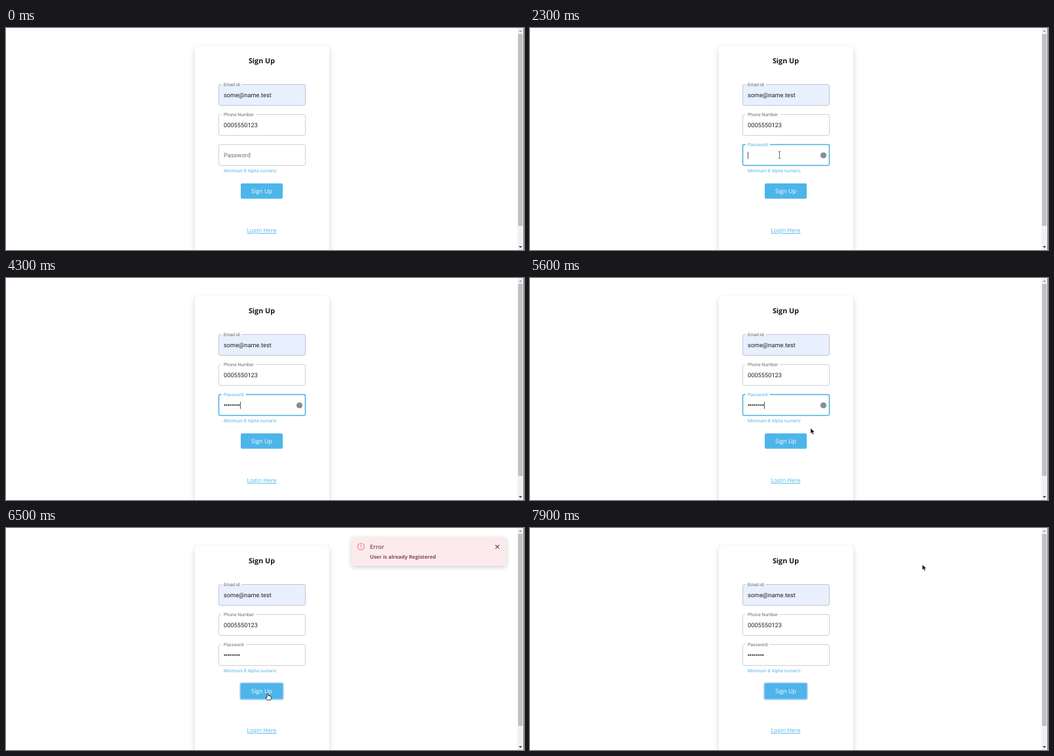
Recreate the animation shown at these times as an HTML page. Size 790 px wide and 340 px high, loop 8 s.

```html
<!DOCTYPE html>
<html lang="en">
<head>
<meta charset="utf-8">
<title>Sign Up</title>
<style>
  html, body { margin: 0; width: 100%; height: 100%; overflow: hidden; background: #fff; }
  svg { display: block; width: 790px; height: 340px; }
  text { font-family: Roboto, sans-serif; font-size: 9.25px; fill: #212121; text-rendering: geometricPrecision; white-space: pre; }
  .ui { font-family: "Open Sans", "Noto Sans", sans-serif; font-size: 8.95px; font-weight: 500; }
  .mid { text-anchor: middle; }
  .small { font-size: 6.92px; fill: #6c6c6c; }
  .card { fill: #fff; filter: drop-shadow(0 0 .7px rgba(0,0,0,.35)) drop-shadow(0 4px 4px rgba(0,0,0,.17)); }
  .toast { fill: #fae6e8; filter: drop-shadow(0 2px 3.5px rgba(0,0,0,.25)); }
  .edge { fill: none; stroke: #d0d0d6; }
  .blue { fill: #4db5ea; }
</style>
</head>
<body>
<svg viewBox="0 0 790 340">
  <rect class="card" x="288" y="28" width="205" height="340" rx="2.5"/>

  <g id="scroll">
    <rect x="780" width="9" height="340" fill="#f1f1f1"/>
    <rect x="781" y="9" width="7" height="294" fill="#c1c1c1"/>
    <path d="M782 6h5l-2.5-3z" fill="#a3a3a3"/>
    <path d="M782 334h5l-2.5 3z" fill="#404040"/>
    <rect x="789" width="1" height="340" fill="#777"/>
  </g>

  <text class="ui mid" x="390" y="54" style="font-size:10.8px;font-weight:700;fill:#17171f">Sign Up</text>

  <rect x="324.5" y="86.5" width="132" height="32" rx="2.5" fill="#e8f0fe"/>
  <path class="edge" id="emailEdge" style="stroke:#bfc3d6"/>
  <text class="small" x="332" y="89">Email id</text>
  <text x="332" y="106">some@name.test</text>

  <path class="edge" id="phoneEdge"/>
  <text class="small" x="332" y="135.2">Phone Number</text>
  <text x="332" y="152">0005550123</text>

  <path class="edge" id="passEdge"/>
  <text id="passLabel" x="332">Password</text>
  <text id="dots" x="332" y="198.2" stroke="#212121" stroke-width=".3"></text>
  <rect id="caret" y="189.5" width=".8" height="11" fill="#222"/>
  <circle id="badge" cx="447.5" cy="195" r="4.6" fill="#8c8c8c"/>
  <text class="small" x="332" y="220.5" style="fill:#58b4e8">Minimum 8 Alpha numeric</text>

  <rect id="ring" x="356.3" y="236.5" width="67.4" height="27" rx="3.5" fill="#a3c8f7"/>
  <rect class="blue" x="358" y="238" width="64" height="23.5" rx="2"/>
  <text class="ui mid" x="390" y="253.3" style="fill:#fff">Sign Up</text>
  <text class="ui mid blue" x="390" y="313.2" text-decoration="underline">Login Here</text>

  <g id="toast">
    <rect class="toast" x="527" y="14" width="236" height="44" rx="3"/>
    <circle cx="541.5" cy="28.5" r="5" fill="none" stroke="#ee5868" stroke-width="1.1"/>
    <path d="M541.5 25.6v3.4M541.5 30.2v1.2" stroke="#ee5868" stroke-width="1.1"/>
    <text class="ui" x="555" y="31.8" style="font-weight:600;fill:#5c1a26">Error</text>
    <text class="ui" x="555" y="47.2" style="font-size:7.8px;font-weight:700;fill:#6b1a28">User is already Registered</text>
    <path d="M746.5 26l5.6 5.6M752.1 26l-5.6 5.6" stroke="#4a1820" stroke-width="1.2"/>
  </g>

  <g id="cursor">
    <path id="arrow" d="M0 0V8.2L2 6.5 3.4 9.6 4.9 8.9 3.5 5.9H6.1Z" fill="#000" stroke="#fff" stroke-width=".5"/>
    <path id="beam" d="M-1.7-5.5Q0-5.5 0-4.5Q0-5.5 1.7-5.5M0-4.5V4.5M-1.7 5.5Q0 5.5 0 4.5Q0 5.5 1.7 5.5" fill="none" stroke="#444" stroke-width=".8"/>
    <path id="hand" d="M-1 .6Q0-.6 1 .6V3.6Q2-.1 2.6 3.9 3.6 3 4.1 4.3 5.4 3.8 5.4 5.4V7.4L4.4 10H-.7L-3 6.6Q-3.6 5 -1 6.2Z" fill="#fff" stroke="#111" stroke-width=".8" stroke-linejoin="round"/>
  </g>
</svg>
<script>
const LOOP = 8000, STEP = 100;
const FOCUS = 2100, SUBMIT = 6400, CLOSE = 7400;
const $ = id => document.getElementById(id);
const show = (id, on) => $(id).setAttribute('visibility', on ? 'visible' : 'hidden');
const ramp = (t, from, to) => Math.min(1, Math.max(0, (t - from) / (to - from)));
const easeOut = u => 1 - (1 - u) ** 2.24;
const inside = (x, y, l, t, r, b) => x > l && x < r && y > t && y < b;

// Pointer strokes: Bezier curves that slow down towards their end
const moves = [
  { from: 1200, to: 2000, until: 4200, curve: [[523, 271], [520, 100], [495, 75], [380.5, 194.5]] },
  { from: 5300, to: 6100, until: 6800, curve: [[383, 193], [467, 218], [399, 253.5]] },
  { from: 6800, to: CLOSE, until: CLOSE, curve: [[399, 253.5], [560, 90], [749, 28]] },
  { from: CLOSE, to: 7900, until: LOOP, curve: [[749, 28], [645, 26], [598.3, 56]] }
];

function bezier(points, u) {
  while (points.length > 1)
    points = points.slice(1).map((p, i) => p.map((v, j) => points[i][j] + (v - points[i][j]) * u));
  return points[0];
}

// Eight keys, struck in bursts of three
const keyTimes = Array.from({ length: 8 }, (_, i) => 3000 + 200 * i - (i % 3 ? 100 : 0));

// Rounded outline with a gap in the top edge for the label
function outline(id, top, gap) {
  const l = 324.5, r = 456.5, b = top + 32, c = 2.5;
  const arc = (x, y) => `A${c} ${c} 0 0 1 ${x} ${y}`;
  $(id).setAttribute('d', `M${328.7 + gap} ${top}H${r - c}${arc(r, top + c)}V${b - c}${arc(r - c, b)}` +
    `H${l + c}${arc(l, b - c)}V${top + c}${arc(l + c, top)}H328.7`);
}

// Places the pointer and returns the top of the field under it, if any
function pointer(t) {
  const move = moves.find(m => t >= m.from && t < m.until);
  let kind = '', field;
  if (move) {
    const [x, y] = bezier(move.curve, easeOut(ramp(t, move.from, move.to)));
    $('cursor').setAttribute('transform', `translate(${x} ${y})`);
    field = [87, 133, 180].find(top => inside(x, y, 324, top, 457, top + 31));
    const link = inside(x, y, 358, 238, 422, 262) || inside(x, y, 743, 22, 756, 35);
    kind = field ? 'beam' : link ? 'hand' : 'arrow';
  }
  for (const k of ['arrow', 'beam', 'hand']) show(k, k === kind);
  return field;
}

function draw(time) {
  const t = Math.floor(time / STEP) * STEP;
  const hovered = pointer(t);
  const focus = t >= FOCUS && t < SUBMIT;
  const lift = easeOut(ramp(t, 2000, 2300));
  const struck = keyTimes.filter(k => k <= t);
  const typed = struck.length;

  outline('passEdge', 178.5, 37 * lift);
  $('passEdge').style.stroke = focus ? '#46aee0' : hovered === 180 ? '#333' : '';
  $('passEdge').style.strokeWidth = focus ? 1.5 : 1;
  $('phoneEdge').style.stroke = hovered === 133 ? '#333' : '';

  const label = $('passLabel');
  label.setAttribute('y', 198.2 - 17 * lift);
  label.style.fontSize = 9.25 - 2.33 * lift + 'px';
  label.style.fill = focus ? '#4db5ea' : '#6c6c6c';

  $('dots').textContent = '\u2022'.repeat(typed);
  $('caret').setAttribute('x', 332.1 + 3.12 * typed);
  const idle = t - Math.max(FOCUS, ...struck);
  show('caret', focus && idle % 1100 < 600);
  show('badge', focus);
  show('ring', t >= SUBMIT);
  $('toast').setAttribute('opacity', easeOut(ramp(t, SUBMIT, 6600)) * (1 - ramp(t, CLOSE, 7600)));
}

outline('emailEdge', 86.5, 31);
outline('phoneEdge', 132.5, 52.5);

const start = performance.now();
function frame() {
  draw((performance.now() - start) % LOOP);
  requestAnimationFrame(frame);
}
frame();
</script>
</body>
</html>
```
